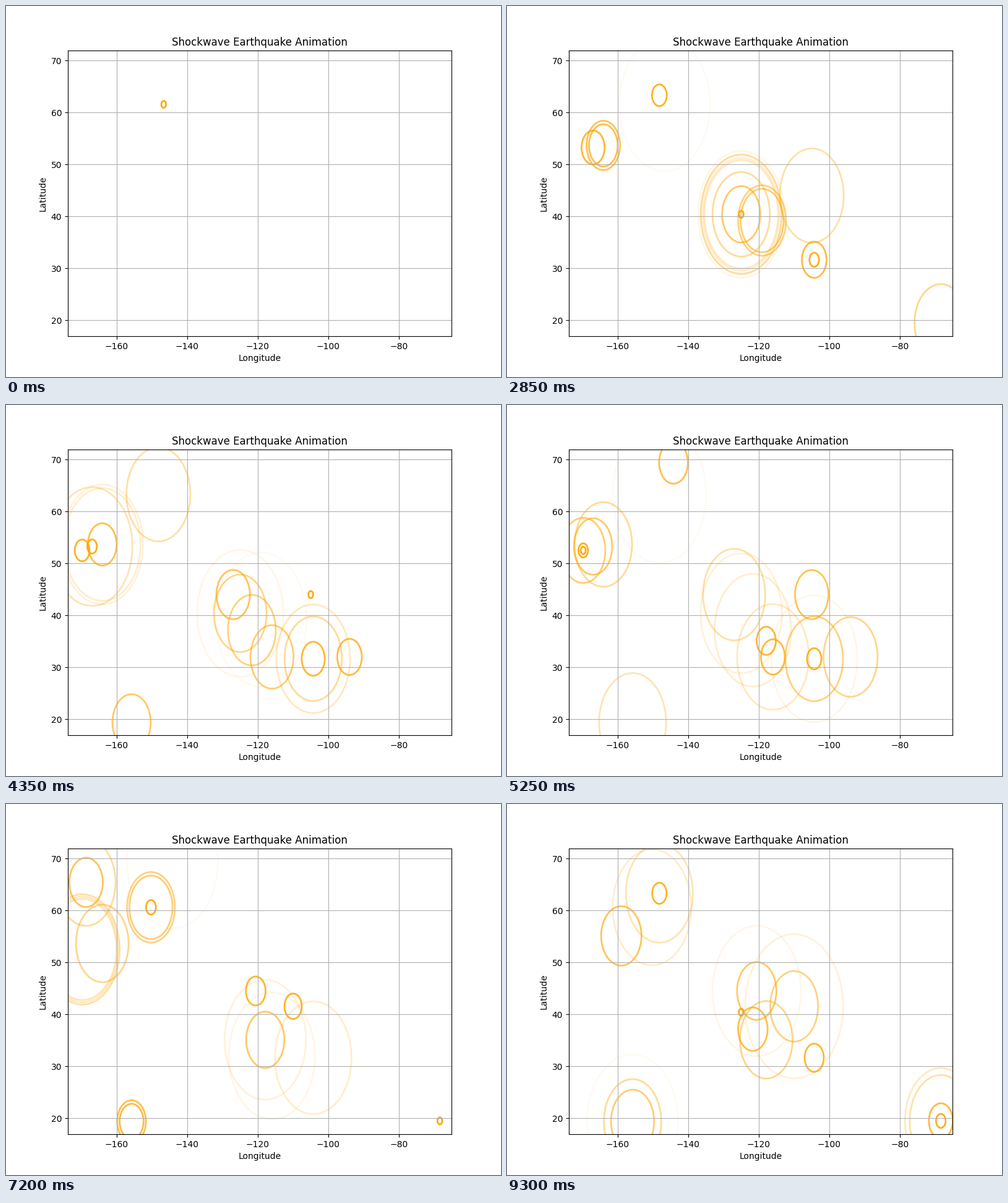
Animation, 800 px wide and 600 px high, one loop 9.45 s. Source, as a matplotlib script:

```python
import itertools

import matplotlib.pyplot as plt
import numpy as np
from matplotlib.animation import FuncAnimation
from matplotlib.patches import Circle

STEPS = 63       # one quake starts at every step
INTERVAL = 150   # ms per step
LIFE = 20        # steps until a wave has faded out
GROWTH = 0.12    # degrees per step and unit of magnitude

# (longitude, latitude) of each active site and the steps when it shakes
SITES = {
    (-146.7, 61.55): [0, 1],
    (-148.2, 63.3): [17, 49, 60],
    (-150.3, 60.6): [39, 40, 47],
    (-164.1, 53.65): [13, 14, 24, 38],
    (-167.0, 53.25): [16, 28],
    (-169.8, 52.5): [27, 34, 35, 36],
    (-168.7, 65.4): [37, 42],
    (-144.2, 69.4): [30],
    (-159.0, 55.1): [56],
    (-125.0, 40.4): [2, 3, 4, 5, 6, 8, 12, 19, 62],
    (-119.1, 39.2): [10, 11],
    (-120.6, 44.5): [45, 55],
    (-121.7, 37.15): [20, 57],
    (-117.9, 35.1): [32, 41, 52],
    (-110.0, 41.55): [46, 53],
    (-104.3, 31.65): [15, 18, 26, 33, 59],
    (-155.8, 19.4): [22, 43, 44, 51, 54],
    (-68.4, 19.5): [9, 48, 50, 58, 61],
}


def inland():
    """Isolated quakes that zigzag westwards across the continent."""
    for i in itertools.count():
        yield -94 - 11 * (i + 1) % 44, 38 + 6 * (-1) ** i


def magnitude(step):
    """Moderate quakes with a strong one every tenth step."""
    return 5.65 + 1.15 * np.cos(np.pi * (step - 6) / 10) ** 40


site_at = {step: site for site, steps in SITES.items() for step in steps}
stray = inland()
centers = [site_at.get(step) or next(stray) for step in range(STEPS)]

fig, ax = plt.subplots(figsize=(8, 6), dpi=100)
ax.set_xlim(-173.86, -65.09)
ax.set_ylim(16.942, 71.909)
ax.set_title("Shockwave Earthquake Animation")
ax.set_xlabel("Longitude")
ax.set_ylabel("Latitude")
ax.grid(True)

waves = [
    ax.add_patch(Circle(center, 0.1, fill=False, edgecolor="orange", lw=2))
    for center in centers
]


def update(step):
    for start, wave in enumerate(waves):
        age = step - start + 1
        alive = 0 < age < LIFE
        wave.set_visible(alive)
        if alive:
            wave.set_radius(GROWTH * magnitude(start) * age)
            wave.set_alpha(1 - age / LIFE)
    return waves


anim = FuncAnimation(fig, update, frames=STEPS, interval=INTERVAL,
                     repeat=True, blit=False)
plt.show()
```
